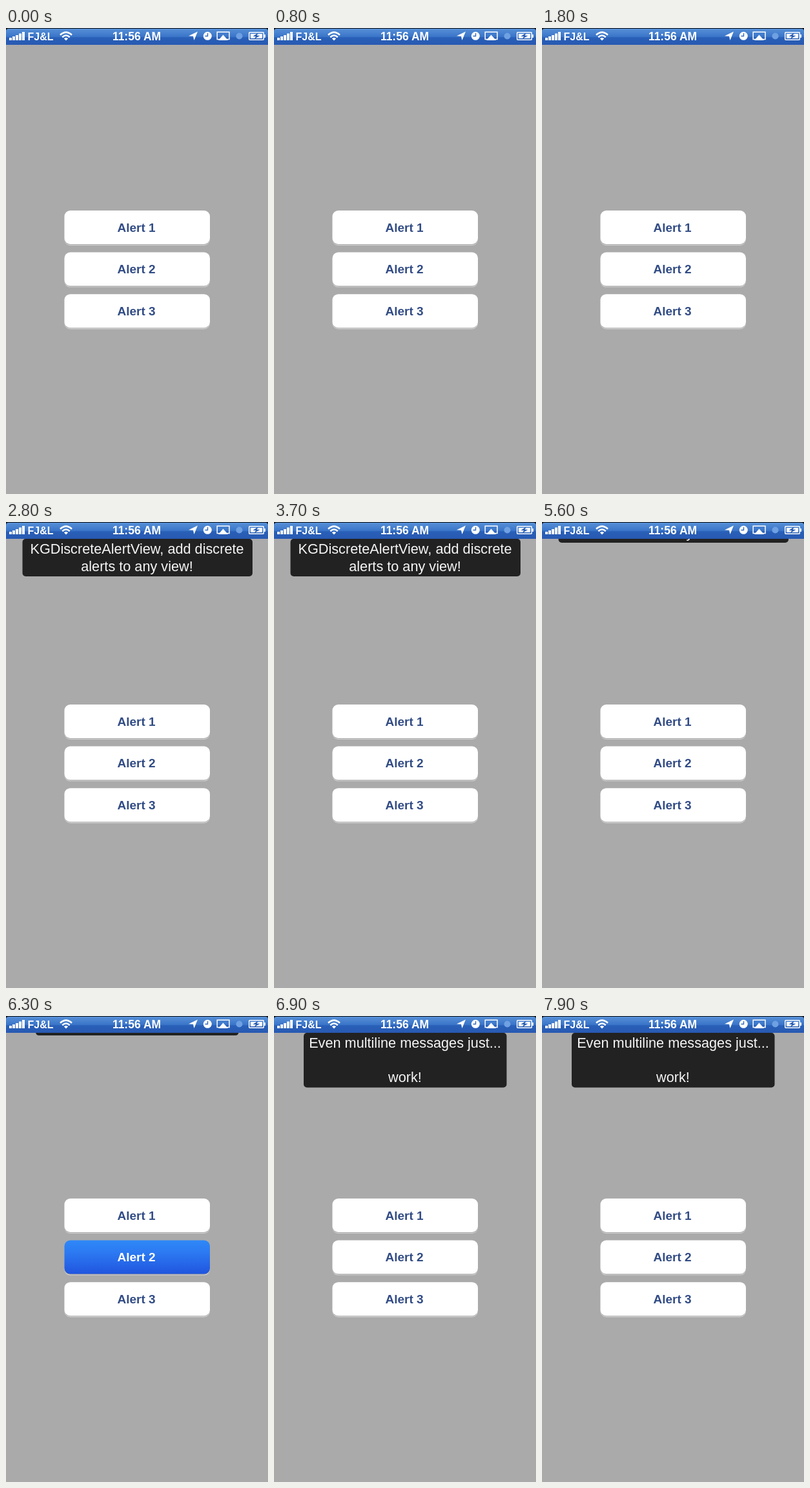
An HTML page for the animation above (8 s loop, 406 by 720 pixels).

```html
<!DOCTYPE html>
<html lang="en">
<head>
<meta charset="utf-8">
<title>Discrete alerts</title>
<style>
  html, body { margin: 0; width: 100%; height: 100%; overflow: hidden; background: #aaa; }
  svg { display: block; width: 100vw; height: 100vh; }
  text { font-family: "Liberation Sans", Arial, sans-serif; text-anchor: middle; }
  .status text { font-weight: bold; font-size: 17.5px; fill: #fff; }
  .button text { font-weight: bold; font-size: 19px; fill: #324c85; }
  .button .face { fill: #fff; }
  .button.pressed .face { fill: url(#press); }
  .button.pressed text { fill: #fff; }
  .banner rect { fill: #222; }
  .banner text { font-size: 21.7px; fill: #f6f6f6; }
</style>
</head>
<body>
<svg viewBox="0 0 406 720">
  <defs>
    <linearGradient id="bar" x2="0" y2="1">
      <stop offset="0" stop-color="#5791d8"/>
      <stop offset=".5" stop-color="#3a74c8"/>
      <stop offset=".55" stop-color="#2960b8"/>
      <stop offset="1" stop-color="#2859b2"/>
    </linearGradient>
    <linearGradient id="press" x2="0" y2="1">
      <stop offset="0" stop-color="#2f88f7"/>
      <stop offset=".35" stop-color="#2c7af2"/>
      <stop offset="1" stop-color="#2055df"/>
    </linearGradient>
  </defs>
  <rect width="406" height="720" fill="#aaa"/>
  <g id="buttons"></g>
  <g id="banners"></g>

  <g class="status">
    <rect width="406" height="26" fill="#111"/>
    <path d="M0 26V5Q0 1 4 1H402Q406 1 406 5V26Z" fill="url(#bar)"/>
    <g id="icons" fill="#fff">
      <path d="M5 15h4v4h-4zM10 13h4v6h-4zM15 11h4v8h-4zM20 8.500h4v10.500h-4zM25 6h4v13h-4z"/>
      <text x="53.500" y="18.700" style="font-size:16px">FJ&amp;L</text>
      <g fill="none" stroke="#fff" stroke-width="2.600">
        <path d="M84 10.800Q93 2.500 102 10.800M87.300 14.200Q93 8.800 98.700 14.200"/>
      </g>
      <path d="M89.800 16.300Q93 13.600 96.200 16.300L93 19.600Z"/>
      <text x="202.500" y="19">11:56 AM</text>
      <path d="M297 5.500L291.500 19L290 12.700L283 12.200Z"/>
      <circle cx="312.300" cy="12.300" r="6.500"/>
      <path d="M312.500 8v4.500h-4" fill="none" stroke="#3168bd" stroke-width="1.400"/>
      <path d="M331 17.500H327.200V6.200H346V17.500H342" fill="none" stroke="#fff" stroke-width="1.500"/>
      <path d="M336.500 10.500L344 19H329Z"/>
      <circle cx="361.500" cy="12.500" r="5" fill="#6fa0e2"/>
      <rect x="376.700" y="6.700" width="22.600" height="11.600" rx="1" fill="none" stroke="#fff" stroke-width="1.500"/>
      <path d="M400 10h2v5h-2zM379 9h18v7h-18z"/>
      <path d="M390.500 7.500L382.500 13H387L384.500 17.500L393.500 11.800H389Z" fill="#2c60b6"/>
    </g>
  </g>
</svg>
<script>
const LOOP = 8000, STEP = 100, SLIDE = 300, BAR = 26;

const buttons = [
  { label: "Alert 1", press: 2200 },
  { label: "Alert 2", press: 6200 },
  { label: "Alert 3", press: Infinity }
];
const banners = [
  { x: 25.5, w: 356.5, h: 58, show: 2260, hide: 5360,
    lines: ["KGDiscreteAlertView, add discrete", "alerts to any view!"] },
  { x: 46, w: 314.5, h: 84.5, show: 6260, hide: Infinity,
    lines: ["Even multiline messages just...", "", "work!"] }
];

function addGroup(parent, className, markup) {
  const g = document.createElementNS("http://www.w3.org/2000/svg", "g");
  g.setAttribute("class", className);
  g.innerHTML = markup;
  document.getElementById(parent).append(g);
  return g;
}

buttons.forEach((b, i) => {
  const y = 282 + 64.6 * i;
  const rect = (dy, fill, name = "") =>
    `<rect class="${name}" x="90.5" y="${y + dy}" width="225.5" height="52" rx="9" fill="${fill}"/>`;
  b.node = addGroup("buttons", "button",
    rect(2, "#d6d6d6") + rect(0.8, "#999") + rect(0, "#fff", "face") +
    `<text x="202" y="${y + 32.8}">${b.label}</text>`);
});

banners.forEach(b => {
  const text = b.lines.map((s, i) => `<text x="203" y="${49 + 26.7 * i}">${s}</text>`).join("");
  b.node = addGroup("banners", "banner",
    `<rect x="${b.x}" y="${BAR}" width="${b.w}" height="${b.h}" rx="5"/>` + text);
});

function ease(t) {
  const p = Math.min(1, Math.max(0, t / SLIDE));
  return p * p * (3 - 2 * p);
}

function draw(now) {
  const t = Math.floor(now % LOOP / STEP) * STEP;
  for (const b of buttons)
    b.node.classList.toggle("pressed", t >= b.press && t < b.press + 200);
  for (const b of banners) {
    const shown = ease(t - b.show) - ease(t - b.hide);
    b.node.setAttribute("transform", `translate(0 ${-b.h * (1 - shown)})`);
    b.node.setAttribute("visibility", shown > 0 ? "visible" : "hidden");
  }
}

const start = performance.now();
function tick() {
  draw(performance.now() - start);
  requestAnimationFrame(tick);
}
tick();
</script>
</body>
</html>
```
